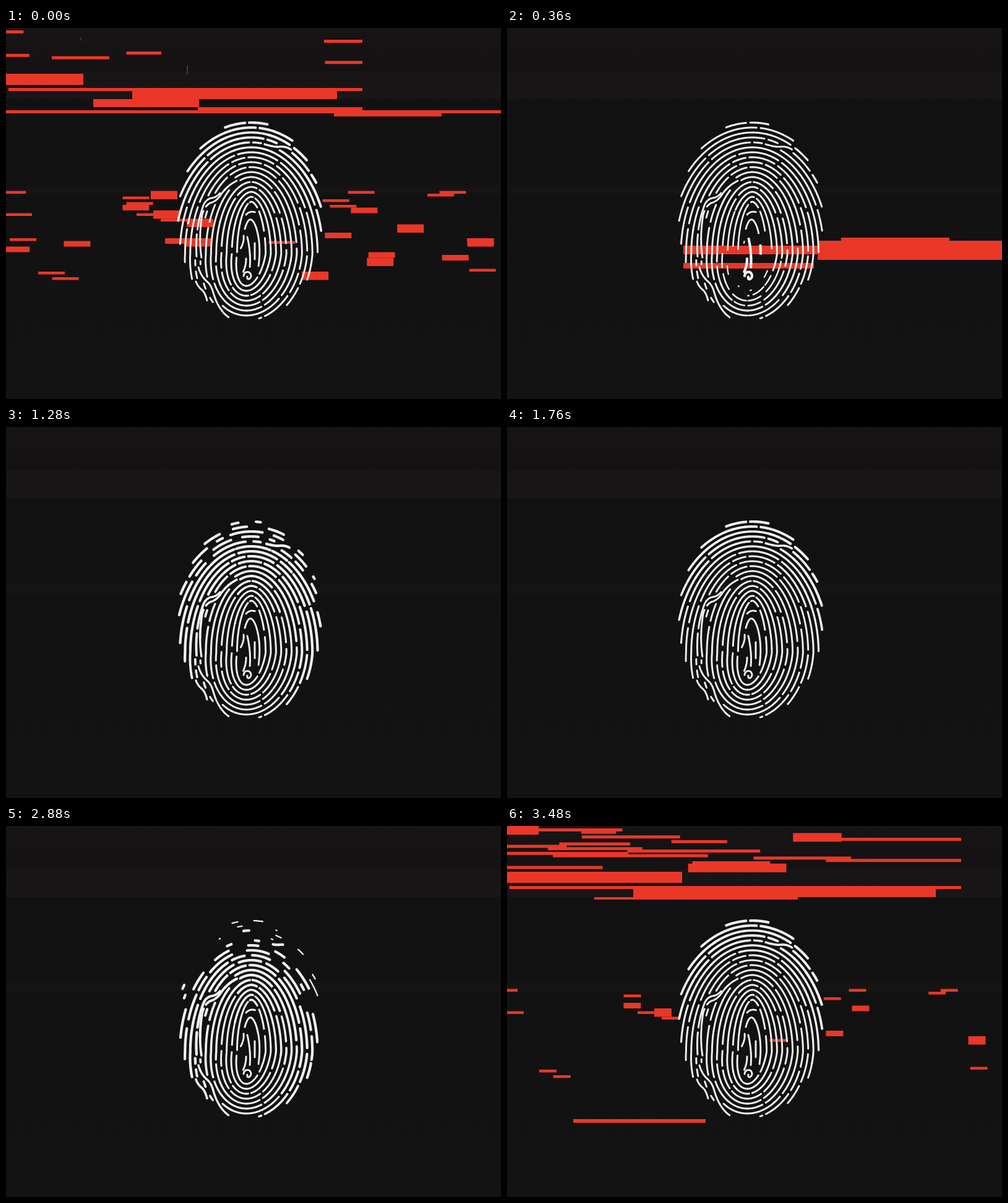
Write an HTML page with a canvas that moves like this. It is 800 px wide and 600 px high and loops after 3520 ms.

```html
<!DOCTYPE html>
<html lang="en">
<head>
<meta charset="utf-8">
<title>Fingerprint</title>
<style>
html, body { margin: 0; width: 100%; height: 100%; overflow: hidden; background: #121212; }
canvas { display: block; }
</style>
</head>
<body>
<canvas width="800" height="600"></canvas>
<script>
const ctx = document.querySelector('canvas').getContext('2d');
const LOOP = 3520, STEP = 40, WAVE = 1760;
const clamp = v => Math.max(0, Math.min(1, v));

let seed = 29;
const random = (lo = 0, hi = 1) => {
  seed = seed * 16807 % 2147483647;
  return lo + (hi - lo) * seed / 2147483647;
};

// ---- Fingerprint geometry ----
// Ridges that break the regular pattern
const details = [
  'M373 247Q357 255 347 270Q341 279 333 282Q322 285 317 302Q311 340 316 372',
  'M346 267Q340 274 332 275Q323 277 319 287Q305 325 308 370',
  'M307 410Q310 418 316 423Q322 428 325 441',
  'M311 387Q315 402 326 411Q332 417 335 428Q343 456 360 468',
  'M418 188Q434 193 442 192Q453 191 461 197',
  'M388 302Q394 295 403 298',
  'M386 325Q394 296 404 322Q413 350 408 385',
  'M384 336Q385 346 379 357', 'M390 338Q396 365 394 387', 'M402 348V374',
  'M388 373Q388 385 383 395',
  'M384 401Q385 393 393 395Q399 401 393 406Q389 407 390 402'
];
const pieces = [];

// Cuts a run of points into strokes, some of them parted by a gap
function addRun(run) {
  for (let i = 0; i < run.length - 3;) {
    let end = i + Math.floor(random(24, 85));
    if (run.length - end < 14) end = run.length - 1;
    const points = run.slice(i, end + 1), [x, y] = points[points.length >> 1];
    const dist = Math.hypot(x - 390, (y - 380) * .6);
    const gone = Math.max(200, 170 + dist * 7.2 + random(-70, 70));
    pieces.push({ points, gone, grow: 80 + dist * dist / 42 });
    i = end + (random() < .5 ? 8 : 0);
  }
}

const detailPoints = [];
for (const d of details) {
  const path = document.createElementNS('http://www.w3.org/2000/svg', 'path');
  path.setAttribute('d', d);
  const run = [];
  for (let s = 0; s <= path.getTotalLength(); s++) {
    const p = path.getPointAtLength(s);
    run.push([p.x, p.y]);
  }
  detailPoints.push(...run);
  addRun(run);
}

const nearDetail = (x, y) => detailPoints.some(p => Math.hypot(p[0] - x, p[1] - y) < 5.6);
const inPrint = (x, y) => Math.hypot((x - 394) / 116, (y - 311) / 160) < 1;

// Nested ridges: tall half ellipses on top, short ones below, cut by the outline
for (let k = -1; k < 16; k++) {
  const rx = 31.5 + 8.4 * k, point = .12 * Math.max(0, 1 - k / 6);
  let run = [];
  for (let a = -Math.PI; a <= Math.PI; a += 1 / (rx + 30)) {
    const s = Math.sin(a), c = Math.cos(a), upper = c > 0;
    const x = 396.5 + rx * s * (upper ? Math.abs(s) ** point : 1) + (upper ? 0 : 8 * c);
    const y = 365 - c * ((upper ? 92 : 60) + 8 * k);
    if (inPrint(x, y) && !nearDetail(x, y)) run.push([x, y]);
    else {
      addRun(run);
      run = [];
    }
  }
  addRun(run);
}

// Each stroke thins out and shrinks to nothing, then grows back bold and settles
function drawPrint(time) {
  ctx.strokeStyle = '#f1f1f0';
  ctx.lineCap = ctx.lineJoin = 'round';
  for (const { points, gone, grow } of pieces) {
    let u = time % WAVE, size, width;
    if (u < gone - 180) u += WAVE;
    if (u < gone) {
      const f = (u - gone + 180) / 180;
      size = 1 - f * f;
      width = 2.8 - .7 * f;
    } else {
      const age = u - gone - 60;
      size = 1 - (1 - clamp(age / grow)) ** 3;
      width = 4.2 - 1.3 * clamp((age - grow) / 450);
    }
    if (size < .02) continue;
    const mid = (points.length - 1) / 2;
    const from = Math.round(mid - mid * size), to = Math.round(mid + mid * size);
    ctx.lineWidth = width;
    ctx.beginPath();
    ctx.moveTo(...points[from]);
    for (let i = from; i <= to; i++) ctx.lineTo(...points[i]);
    ctx.stroke();
  }
}

// ---- Red glitch, n counts steps from the start of the loop ----
const make = (count, build) => Array.from({ length: count }, build);

// Bars at the top, their right ends retreating; w is the width at n = 0
const topBars = [
  { x: 0, y: 74, w: 125, h: 18 },
  { x: 4, y: 97, w: 572, h: 5 },
  { x: 204, y: 101, w: 331, h: 14 },
  { x: 141, y: 115, w: 171, h: 13 },
  { x: 310, y: 128, w: 266, h: 5 },
  ...make(18, (_, i) => {
    const x = Math.max(0, random(-150, 560));
    return { x, y: i * 3.8, w: Math.min(random(-120, 110), 576 - x), h: random() < .2 ? 14 : 5 };
  })
];

// Small blocks left and right of the middle; all widths grow together
const blocks = make(34, (_, i) => ({
  x: i % 2 ? random(410, 770) : random(-15, 300),
  y: 259 + 4.5 * Math.floor(random(0, 33)),
  h: 4.5 * Math.ceil(3 * random() ** 2),
  born: i < 18 ? -2 : 0,
  dies: Math.floor(random(1, 7))
}));

function drawGlitch(n) {
  ctx.fillStyle = '#ea3728';
  const bar = (x, y, w, h) => w > 0 && h > 0 && ctx.fillRect(x, y, w, h);
  if (n >= -2 && n < 5) {
    const floor = 143 + 24 * n;
    for (const { x, y, w, h } of topBars) bar(x, y, w - 158 * n, Math.min(h, floor - y));
  }
  if (n >= -2 && n < 0) bar(107, 474, 56 - 158 * n, 6);
  if (n === 0) {
    bar(0, 133, 800, 5);
    bar(530, 137, 174, 6);
  }
  for (const { x, y, h, born, dies } of blocks) {
    if (n >= born && n < dies) bar(x, y, 43 + 15 * n, h);
  }
  if (n > 6 && n < 12) {
    const shift = 15 * (n - 9);
    bar(285 + shift, 352, 220, 14);
    bar(502 + shift, 344, 400, 31);
    bar(540 + shift, 339, 175, 6);
    bar(285 + shift, 380, 211, 9);
  }
}

// ---- Backdrop with faint horizontal bands ----
const backdrop = ctx.createLinearGradient(0, 0, 0, 600);
const shade = (y, color) => backdrop.addColorStop(y / 600, color);
shade(0, '#171416');
shade(69, '#141213');
shade(71, '#181516');
shade(114, '#191617');
shade(116, '#121111');
shade(250, '#121111');
shade(262, '#181415');
shade(272, '#121111');
shade(600, '#131313');

const start = performance.now();
function frame() {
  const index = Math.floor((performance.now() - start) % LOOP / STEP);
  ctx.fillStyle = backdrop;
  ctx.fillRect(0, 0, 800, 600);
  drawGlitch(index < 44 ? index : index - LOOP / STEP);
  drawPrint(index * STEP);
  requestAnimationFrame(frame);
}
frame();
</script>
</body>
</html>
```
